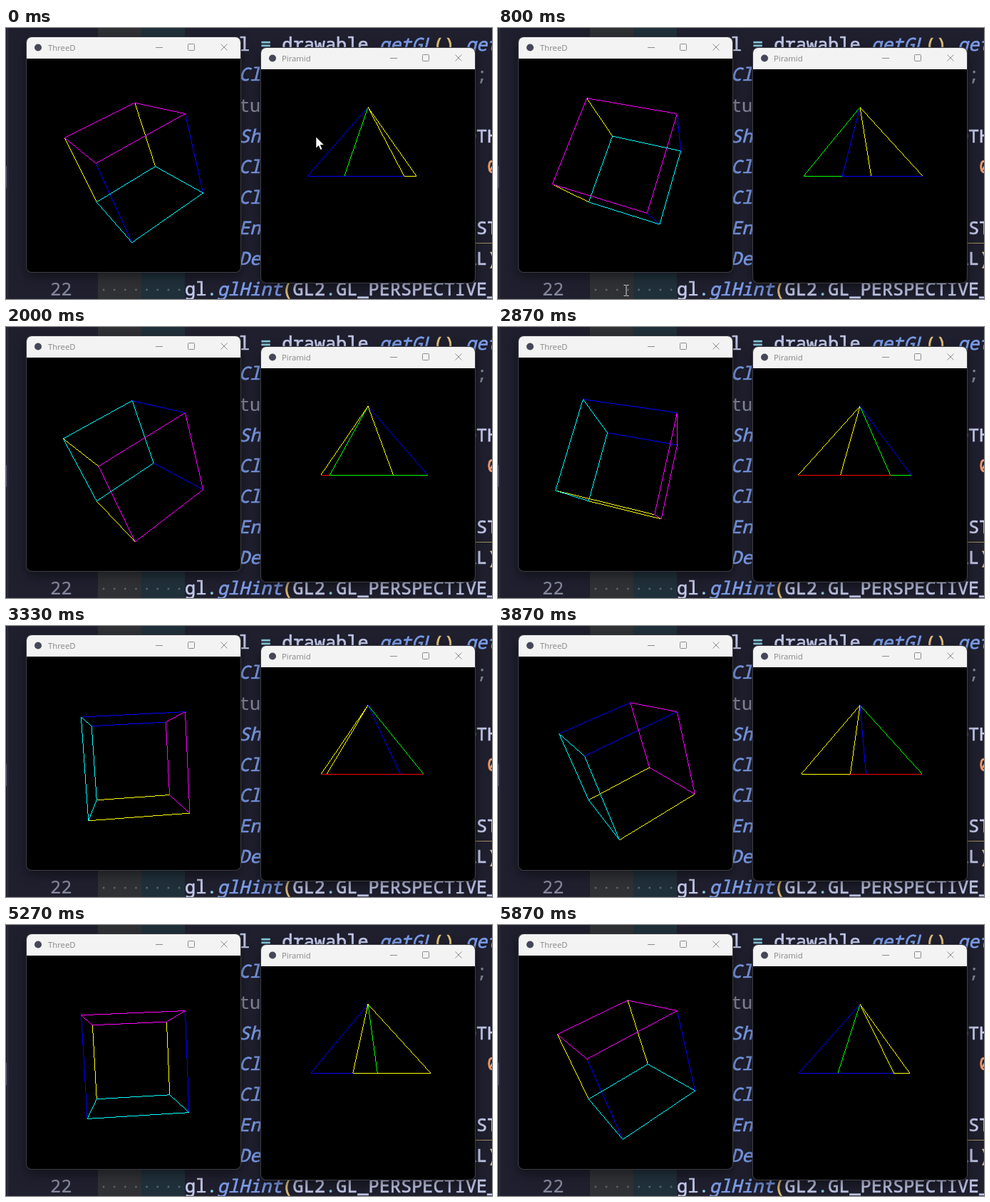
Animation, 682 px wide and 381 px high, one loop 5940 ms. Source, as an HTML page with a canvas:

```html
<!DOCTYPE html>
<html lang="en">
<head>
<meta charset="utf-8">
<title>Rotating wireframes</title>
<style>
  html, body { margin: 0; width: 100%; height: 100%; overflow: hidden; background: #1f1f2e; }
  #stage { position: relative; width: 682px; height: 381px; overflow: hidden; }
  #stage > svg, canvas { position: absolute; left: 0; top: 0; }
  .code { font: 500 25.25px "Noto Sans Mono", "DejaVu Sans Mono", monospace; white-space: pre; color: #c3c9ea; }
  .code text, .code tspan { fill: currentColor; stroke: currentColor; stroke-width: .7; }
  .code .m { color: #7c9ce8; font-style: italic; }
  .code .p { color: #e3c07a; }
  .code .o { color: #86c5d8; }
  .code .n { color: #f09a6a; }
  .code .c { color: #85889c; stroke-width: .2; }
  .win { position: absolute; width: 300px; height: 330px; border-radius: 7px; background: #000;
    overflow: hidden; box-shadow: 0 0 0 1px #3d3d45, 0 6px 18px rgba(0, 0, 0, .45); }
  .bar { height: 30px; background: #f3f3f3; position: relative; }
  .bar b { position: absolute; left: 30px; top: 0; color: #868686;
    font: 11.3px/29px "Open Sans", "Noto Sans", sans-serif; }
  .bar svg { position: absolute; left: 0; top: 0; }
</style>
</head>
<body>
<div id="stage">
  <svg width="682" height="381">
    <path d="M129 0h61v381h-61z" fill="#303135"/>
    <path d="M190 0h61v381h-61z" fill="#20303a"/>
    <path d="M2.5 0v381" stroke="#35364a"/>
    <path d="M.5 194v31" stroke="#5a5c78"/>
    <path d="M658 302.5h24" stroke="#a58d5c"/>
    <path d="M137 368h113" stroke="#5d606d" stroke-width="3" stroke-linecap="round" stroke-dasharray="0 15.15"/>
    <g class="code">
      <text x="251" y="32">GL2 gl <tspan class="o">=</tspan> drawable<tspan class="o">.</tspan><tspan class="m">getGL</tspan><tspan class="p">()</tspan><tspan class="o">.</tspan><tspan class="m">getGL2</tspan></text>
      <text x="251" y="74">gl.<tspan class="m">glClearAccum</tspan>(0, 0, 0, 0)<tspan class="c">;</tspan></text>
      <text x="251" y="118" class="c">// setup</text>
      <text x="251" y="161">gl.<tspan class="m">glShadeModel</tspan>(GL2.GL_SMOOTH)</text>
      <text x="251" y="204">gl.<tspan class="m">glClearColor</tspan>(<tspan class="n">0f, 0f, 0f, 0f</tspan>)</text>
      <text x="251" y="247">gl.<tspan class="m">glClearDepth</tspan>(1f)</text>
      <text x="251" y="290">gl.<tspan class="m">glEnable</tspan>(GL2.GL_DEPTH_TEST)</text>
      <text x="251" y="333">gl.<tspan class="m">glDepthFunc</tspan>(GL2.GL_LEQUAL<tspan class="p">)</tspan></text>
      <text x="251" y="376">gl<tspan class="o">.</tspan><tspan class="m">glHint</tspan><tspan class="p">(</tspan>GL2<tspan class="o">.</tspan>GL_PERSPECTIVE_</text>
      <text x="62" y="376" class="c">22</text>
    </g>
  </svg>

  <div class="win" style="left:29px;top:13px">
    <div class="bar"><b>ThreeD</b>
      <svg width="300" height="30"><g id="chrome" fill="none" stroke="#8b8b8b">
        <circle cx="16" cy="14.5" r="5" fill="#454759" stroke="none"/>
        <path d="M181 14.5h10M272.500 9.500l9 9M281.500 9.500l-9 9"/>
        <rect x="226.500" y="9.500" width="9" height="9" rx="1"/>
      </g></svg>
    </div>
  </div>
  <div class="win" style="left:358px;top:28px">
    <div class="bar"><b style="left:29px">Piramid</b>
      <svg width="300" height="30"><use href="#chrome"/></svg>
    </div>
  </div>

  <canvas id="view" width="682" height="381"></canvas>
  <svg width="682" height="381">
    <path id="arrow" d="M0 0v16l3.700-3.500 2.500 5.800 2.600-1.100-2.500-5.700h5.200z" fill="#fff" stroke="#000" stroke-width=".6"/>
    <path id="beam" d="M-3.500-7.500h3M.5-7.500h3M0-7V7M-3.500 7.500h3M.5 7.500h3" fill="none" stroke="#d5d5d8"/>
  </svg>
</div>
<script>
const LOOP = 5940, STEP = 200 / 3;
const FOCAL = 150 / Math.tan(Math.PI / 8), DIST = 6;
const RAD = Math.PI / 180;
const ctx = document.getElementById('view').getContext('2d');
const arrow = document.getElementById('arrow');
const beam = document.getElementById('beam');

// step, cube angle, pyramid angle
const SPIN = [[0, 43, 28], [12, 92, 77], [30, 166, 150], [43, 218, 203],
  [58, 279, 263], [71, 332, 316], [88, 402, 386]];
// step, x, y
const MOUSE = [[0, 435, 153], [3, 560, 70], [5, 668, 38], [7, 610, 200],
  [9, 390, 350], [10, 290, 361], [12, 180, 369], [14, 172, 376], [15, 170, 392]];

function sample(keys, n) {
  let i = 1;
  while (i < keys.length - 1 && n > keys[i][0]) i++;
  const a = keys[i - 1], b = keys[i];
  const u = Math.min(1, (n - a[0]) / (b[0] - a[0]));
  return [1, 2].map(k => Math.round(a[k] + (b[k] - a[k]) * u));
}

const project = ([x, y, z], cx, cy) =>
  [cx + FOCAL * x / (DIST - z), cy - FOCAL * y / (DIST - z)];

// Hard-edged one-pixel line, sampled at pixel centres along its longer axis
function line(a, b, color) {
  const major = Math.abs(b[0] - a[0]) >= Math.abs(b[1] - a[1]) ? 0 : 1;
  const minor = 1 - major;
  if (a[major] > b[major]) [a, b] = [b, a];
  const slope = (b[minor] - a[minor]) / (b[major] - a[major]);
  const end = Math.round(b[major]);
  ctx.fillStyle = color;
  for (let m = Math.round(a[major]); m < end; m++) {
    const k = Math.floor(a[minor] + (m + .5 - a[major]) * slope);
    ctx.fillRect(major ? k : m, major ? m : k, 1, 1);
  }
}

// Rotation about the (1,1,1) diagonal
function turn([x, y, z], deg) {
  const c = Math.cos(deg * RAD), s = Math.sin(deg * RAD) / Math.sqrt(3);
  const d = (x + y + z) * (1 - c) / 3;
  return [x * c + (z - y) * s + d, y * c + (x - z) * s + d, z * c + (y - x) * s + d];
}

function drawCube(deg) {
  const corner = i => [1, 2, 4].map(bit => i & bit ? 1 : -1);
  const pts = [...Array(8).keys()].map(i => project(turn(corner(i), deg), 179, 193));
  for (const bit of [2, 1, 4])
    for (let i = 0; i < 8; i++) {
      if (i & bit) continue;
      const color = bit === 2 ? (i & 4 ? '#00f' : '#ff0') : (i & 2 ? '#f0f' : '#0ff');
      line(pts[i], pts[i | bit], color);
    }
}

function drawPyramid(deg) {
  const sides = [0, 1, 2, 3];
  const faces = ['#ff0', '#f00', '#0f0', '#00f'];
  const edges = ['#ff0', '#ff0', '#0f0', '#00f'];
  const apex = project([0, 1.6, 0], 508, 208);
  const base = sides.map(k => {
    const a = (deg + 90 * k) * RAD;
    return project([Math.SQRT2 * Math.sin(a), 0, Math.SQRT2 * Math.cos(a)], 508, 208);
  });
  const near = k => Math.cos((deg + 90 * k + 45) * RAD);
  sides.slice().sort((a, b) => near(a) - near(b))
    .forEach(k => line(base[k], base[(k + 1) % 4], faces[k]));
  for (const k of [2, 3, 0, 1]) line(apex, base[k], edges[k]);
}

function drawMouse(n) {
  const [x, y] = sample(MOUSE, n);
  const inside = (l, t) => x >= l && x < l + 300 && y >= t && y < t + 330;
  const over = inside(29, 13) || inside(358, 28);
  arrow.style.display = over && n < 15 ? '' : 'none';
  beam.style.display = !over && n < 15 ? '' : 'none';
  arrow.setAttribute('transform', `translate(${x} ${y})`);
  beam.setAttribute('transform', `translate(${x} ${y})`);
}

function draw() {
  const t = performance.now() % LOOP;
  const n = Math.min(88, Math.floor((t + 3.4) / STEP));
  const [cube, pyramid] = sample(SPIN, n);
  ctx.clearRect(0, 0, 682, 381);
  drawCube(cube);
  drawPyramid(pyramid);
  drawMouse(n);
  requestAnimationFrame(draw);
}
draw();
</script>
</body>
</html>
```
